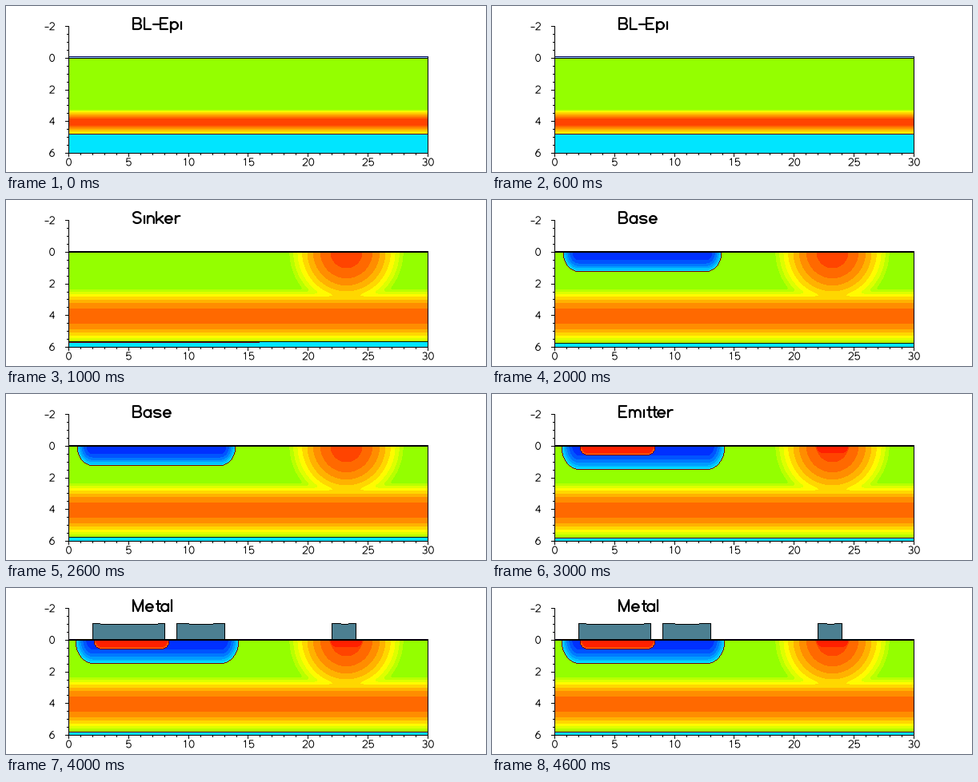
A matplotlib script that plays this animation: 600 by 208 pixels, repeating every 5000 ms.

```python
import colorsys

import matplotlib.pyplot as plt
import numpy as np
from matplotlib.animation import FuncAnimation
from matplotlib.collections import LineCollection

W, H, DPI = 600, 208, 100
PX = 72 / DPI
LEFT, RIGHT, TOP, BOTTOM = 78, 527, 65, 184
SX, SY = (RIGHT - LEFT) / 30, (BOTTOM - TOP) / 6
STEPS = ["BL-Epi", "Sinker", "Base", "Emitter", "Metal"]


def px(x):
    return LEFT + x * SX


def py(y):
    return TOP + y * SY


# ---- stroke lettering: cap height 14, x-height 9, y up ----
def arc(cx, cy, rx, ry, a0=0, a1=360):
    a = np.radians(np.linspace(a0, a1, 24))
    return list(zip(cx + rx * np.cos(a), cy + ry * np.sin(a)))


def stem(x, top):
    return [(x, top), (x, 0)]


def ess(rx, ry):
    return [arc(rx, 3 * ry, rx, ry, 25, 270) + arc(rx, ry, rx, ry, 90, -155)]


def arch(x, r):
    return arc(x + r, 5.2, r, 3.8, 180, 0) + [(x + 2 * r, 0)]


BOWL = arc(4.4, 4.5, 4.4, 4.5)

# glyph: (advance, strokes)
GLYPHS = {
    "B": (13.5, [[(6, 7), (0, 7), (0, 14)] + arc(6, 10.5, 3.4, 3.5, 90, -90)
                 + arc(6, 3.5, 4, 3.5, 90, -90) + stem(0, 14)[1:] + [(0, 7)]]),
    "L": (11, [stem(0, 14) + [(8.5, 0)]]),
    "-": (9.5, [[(0, 6), (7, 6)]]),
    "E": (13, [[(9, 14)] + stem(0, 14) + [(9, 0)], [(0, 7), (7, 7)]]),
    "S": (13.5, ess(4.8, 3.5)),
    "M": (16, [[(0, 0), (0, 14), (6, 0), (12, 14), (12, 0)]]),
    "a": (12.5, [BOWL, stem(8.8, 9)]),
    "e": (12.5, [[(0, 4.5), (8.8, 4.5)] + arc(4.4, 4.5, 4.4, 4.5, 0, 318)]),
    "i": (4.5, [stem(0, 9)]),
    "k": (11, [stem(0, 14), [(8, 9), (0, 3)], [(3, 5.5), (8.5, 0)]]),
    "l": (4.5, [stem(0, 14)]),
    "m": (17.5, [stem(0, 9), arch(0, 3.4), arch(6.8, 3.4)]),
    "n": (11, [stem(0, 9), arch(0, 3.9)]),
    "p": (12.5, [[(0, 9), (0, -4)], BOWL]),
    "r": (7, [stem(0, 9), arc(5, 4.5, 5, 4.5, 180, 80)]),
    "s": (12, ess(4.2, 2.25)),
    "t": (6.7, [[(2.5, 13)] + arc(5, 2.5, 2.5, 2.5, 180, 280), [(0, 9), (5, 9)]]),
    "0": (12, [arc(4.5, 7, 4.5, 7)]),
    "1": (12, [[(2, 11), (5, 14), (5, 0)]]),
    "2": (12, [arc(4.5, 10, 4.3, 4, 165, -40) + [(0, 0), (9, 0)]]),
    "3": (12, [arc(4.2, 10.5, 4, 3.5, 150, -90) + arc(4.2, 3.5, 4.5, 3.5, 90, -155)]),
    "4": (12, [[(7, 0), (7, 14), (0, 4.5), (9.5, 4.5)]]),
    "5": (12, [[(8, 14), (1, 14), (0.5, 7)] + arc(4.5, 4.5, 4.5, 4.5, 135, -155)]),
    "6": (12, [BOWL, [(7.5, 14), (4.5, 13), (1.5, 9.5), (0, 4.5)]]),
}


def strokes(text, x, base, scale=1.0):
    out = []
    for ch in text:
        advance, paths = GLYPHS[ch]
        out += [[(x + scale * u, base - scale * v) for u, v in p] for p in paths]
        x += scale * advance
    return out


def width(text, scale):
    return scale * (sum(GLYPHS[c][0] for c in text) - 3)


# ---- doping maps ----
def hue_table(start, step, n):
    return np.array([colorsys.hsv_to_rgb((start + step * k) / 360, 1, 1) for k in range(n)])


N_COLORS = hue_table(85, -8.6, 10)
P_COLORS = hue_table(186, 8.5, 7)
JUNCTION = (0.45, 0, 0.05)
METAL = (0.3, 0.5, 0.57)
Y, X = np.mgrid[0:H, 0:W].astype(float)


def well(x0, x1, side, depth):
    """Squared relative distance from a surface window; 1 at the junction."""
    dx = np.maximum(0, np.maximum(x0 + side - X, X - x1 + side))
    return (dx / side) ** 2 + ((Y - TOP) / depth) ** 2


def paint(img, mask, level, colors):
    k = np.clip(np.floor(level), 0, len(colors) - 1).astype(int)
    img[mask] = colors[k[mask]]


def outline(img, mask, color):
    inner = mask.copy()
    for axis in (0, 1):
        for d in (-1, 1):
            inner &= np.roll(mask, d, axis)
    img[mask & ~inner] = color


def rule(img, x0, y0, x1, y1):
    img[y0:y1 + 1, x0:x1 + 1] = 0


def draw_axes(img):
    rule(img, LEFT, 25, LEFT, BOTTOM)
    rule(img, LEFT, BOTTOM, RIGHT, BOTTOM)
    rule(img, RIGHT, 64, RIGHT, BOTTOM)
    for i in range(31):
        x = round(px(i))
        rule(img, x, BOTTOM, x, BOTTOM + (4 if i % 5 == 0 else 2))
    for i in range(-4, 13):
        y = round(py(i / 2))
        rule(img, LEFT - (4 if i % 4 == 0 else 2), y, LEFT, y)


def contact(img, x0, x1, dip0, dip1):
    """Metal block with a shallow dip in its top face."""
    top = 44 + ((X > dip0) & (X < dip1))
    mask = (X >= x0) & (X <= x1) & (Y >= top) & (Y <= TOP)
    img[mask] = METAL
    outline(img, mask, (0, 0, 0))


def cross_section(step):
    img = np.ones((H, W, 3))
    body = (X >= LEFT) & (X <= RIGHT) & (Y >= TOP) & (Y <= BOTTOM)

    if step == 0:
        level = 8.5 - ((Y - 145) / 5.66) ** 2
    else:
        buried = 7.6 - ((Y - 145) / 12.9) ** 2
        sinker = 8.6 - ((X - 425) ** 2 + (Y - TOP) ** 2) / 25.8 ** 2
        level = np.logaddexp(2 * buried, 2 * sinker) / 2
    if step >= 3:
        level = np.maximum(level, 9.8 - 5 * well(402, 448, 12, 12) ** 3)
    paint(img, body, level, N_COLORS)

    edge = (160, 177, 179, 180, 180)[step]
    img[body & (Y > edge)] = P_COLORS[0]
    img[body & (Y == edge)] = (0, 0.1, 0) if step in (1, 2) else JUNCTION
    if step == 1:
        img[body & (Y == edge + 1) & (X <= 316)] = JUNCTION

    if step >= 2:
        t2 = well(88, 287, 20, 24.5) if step == 2 else well(86, 291, 23, 29.5)
        mask = body & (t2 <= 1)
        paint(img, mask, 5.95 * (1 - t2), P_COLORS)
        outline(img, mask, JUNCTION)
    if step >= 3:
        t2 = well(109, 204, 10, 11.5)
        mask = body & (t2 <= 1)
        paint(img, mask, 9.8 - 5 * t2 ** 3, N_COLORS)
        outline(img, mask, JUNCTION)
    if step == 4:
        contact(img, 108, 198, 117, 190)
        contact(img, 213, 273, 228, 259)
        contact(img, 407, 437, 418, 428)

    if step == 0:
        img[63, LEFT:RIGHT + 1] = (0, 0, 0.35)
        img[64, LEFT:RIGHT + 1] = (0.6, 0.85, 1)
        rule(img, LEFT, 65, RIGHT, 65)
    else:
        rule(img, LEFT, 64, RIGHT, 65)
    draw_axes(img)
    return img


fig = plt.figure(figsize=(W / DPI, H / DPI), dpi=DPI, facecolor="white")
ax = fig.add_axes([0, 0, 1, 1])
ax.axis("off")

maps = [cross_section(k) for k in range(len(STEPS))]
picture = ax.imshow(maps[0], interpolation="nearest", aspect="auto", zorder=1)
ax.set_xlim(-0.5, W - 0.5)
ax.set_ylim(H - 0.5, -0.5)

SMALL = 0.65
labels = []
for v in range(0, 31, 5):
    labels += strokes(str(v), px(v) - width(str(v), SMALL) / 2, 199.5, SMALL)
for v in range(-2, 7, 2):
    labels += strokes(str(v), 60 - width(str(v), SMALL), py(v) + 4, SMALL)
ax.add_collection(LineCollection(labels, colors="black", lw=PX, zorder=3))
title = ax.add_collection(LineCollection([], colors="black", lw=2.2 * PX,
                                         capstyle="round", joinstyle="round", zorder=4))


def draw(step):
    picture.set_data(maps[step])
    title.set_segments(strokes(STEPS[step], 158.5, 28.5))
    return picture, title


anim = FuncAnimation(fig, draw, frames=len(STEPS), interval=1000, repeat=True, repeat_delay=0)
plt.show()
```
